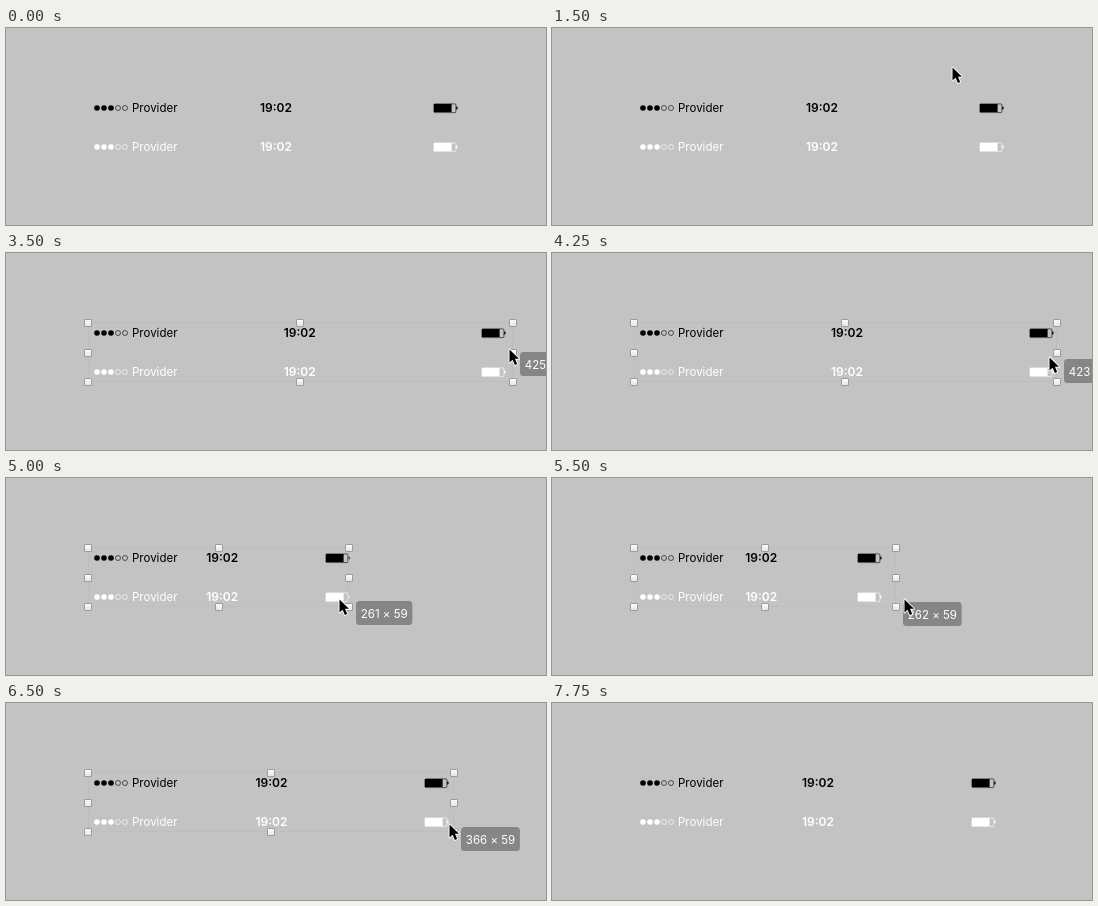
Animation, 540 px wide and 197 px high, one loop 9000 ms. Source, as an HTML page with a canvas:

```html
<!DOCTYPE html>
<html lang="en">
<head>
<meta charset="utf-8">
<title>Resizing status bars</title>
<style>
  html, body { margin: 0; width: 100%; height: 100%; overflow: hidden; background: #c3c3c3; }
  canvas { display: block; width: 540px; height: 197px; }
</style>
</head>
<body>
<canvas id="stage"></canvas>
<script>
const WIDTH = 540, HEIGHT = 197, LOOP = 9000, STEP = 250;
const LEFT = 82, TOP = 70, BOTTOM = 129;
const LAG = 45; // ms the bars trail the selection, and the selection trails the cursor

const canvas = document.getElementById('stage');
const ctx = canvas.getContext('2d');
const ratio = window.devicePixelRatio || 1;
canvas.width = WIDTH * ratio;
canvas.height = HEIGHT * ratio;
ctx.scale(ratio, ratio);

const ease = p => p < 0.5 ? 4 * p ** 3 : 1 - 4 * (1 - p) ** 3;

// Each move is [start time, end time, distance].
function travel(time, origin, ...moves) {
  return moves.reduce((value, [start, end, distance]) => {
    const progress = Math.min(1, Math.max(0, (time - start) / (end - start)));
    return value + distance * ease(progress);
  }, origin);
}

const widthAt = time => travel(time, 375,
  [2750, 3750, 53], [3976, 5418, -185], [5256, 6000, 135], [6000, 6500, -12], [7250, 7500, 1]);

const cursorX = time => LEFT + widthAt(time + LAG) +
  travel(time, -58, [1250, 2750, 53], [7000, 7500, 26]);

const cursorY = time => travel(time, 34,
  [1250, 2250, 82], [2250, 2750, -20], [3500, 5250, 25], [7000, 7500, 44]);

function setFont(size, weight = 400) {
  ctx.font = `${weight} ${size}px Inter, Roboto, sans-serif`;
}

function roundRect(x, y, w, h, r) {
  ctx.beginPath();
  ctx.roundRect(x, y, w, h, r);
}

function statusBar(y, width, color) {
  ctx.fillStyle = ctx.strokeStyle = color;
  ctx.lineWidth = 0.6;
  for (let i = 0; i < 5; i++) {
    ctx.beginPath();
    ctx.arc(91 + i * 7, y, i < 3 ? 2.8 : 2.5, 0, Math.PI * 2);
    i < 3 ? ctx.fill() : ctx.stroke();
  }
  setFont(11.5);
  ctx.fillText('Provider', 126, y + 4);
  setFont(12, 600);
  ctx.textAlign = 'center';
  ctx.fillText('19:02', LEFT + width / 2 + 0.5, y + 4);
  ctx.textAlign = 'left';

  const x = Math.round(LEFT + width - 30);
  roundRect(x + 0.9, y - 4.1, 22, 8.7, 1);
  ctx.stroke();
  ctx.fillRect(x + 1, y - 4, 17.6, 8);
  roundRect(x + 23.2, y - 1.6, 1.4, 3.2, [0, 1, 1, 0]);
  ctx.fill();
}

function handle(centerX, centerY) {
  const x = Math.round(centerX) - 4, y = Math.round(centerY) - 4;
  const shine = ctx.createLinearGradient(0, y, 0, y + 8);
  shine.addColorStop(0, '#fff');
  shine.addColorStop(1, '#e2e2e2');
  roundRect(x, y, 8, 8, 1.5);
  ctx.fillStyle = '#9c9c9c';
  ctx.fill();
  ctx.fillStyle = shine;
  ctx.fillRect(x + 1, y + 1, 6, 6);
}

function selection(width) {
  ctx.strokeStyle = '#b9b9b9';
  ctx.lineWidth = 1;
  ctx.setLineDash([1, 1]);
  ctx.strokeRect(LEFT + 0.5, TOP - 0.5, Math.round(width) - 1, BOTTOM - TOP);
  ctx.setLineDash([]);

  for (const column of [0, 0.5, 1]) {
    for (const row of [0, 0.5, 1]) {
      if (column === 0.5 && row === 0.5) continue;
      handle(LEFT + width * column, TOP + (BOTTOM - TOP) * row);
    }
  }
}

function sizeLabel(width, top) {
  const label = `${Math.round(width)} × 59`;
  const x = Math.round(LEFT + width + 7), y = Math.floor(top);
  setFont(11.5);
  roundRect(x, y, ctx.measureText(label).width + 9.5, 24, 3.5);
  ctx.fillStyle = '#868686';
  ctx.fill();
  ctx.fillStyle = '#fff';
  ctx.fillText(label, x + 4.8, y + 16.5);
}

function cursor(x, y) {
  const arrow = new Path2D('M.5 .5V13.5L3.6 10.7L5.9 16L8.2 15L6 9.8H10Z');
  ctx.save();
  ctx.translate(Math.round(x), Math.round(y));
  ctx.lineJoin = 'round';
  ctx.fillStyle = '#000';
  ctx.strokeStyle = '#fff';
  ctx.lineWidth = 1.8;
  ctx.stroke(arrow);
  ctx.fill(arrow);
  ctx.restore();
}

function draw(now) {
  const time = Math.floor((now % LOOP) / STEP) * STEP;
  const during = (start, end) => time >= start && time < end;
  const width = widthAt(time), barWidth = widthAt(time - LAG);
  const y = cursorY(time);

  ctx.fillStyle = '#c3c3c3';
  ctx.fillRect(0, 0, WIDTH, HEIGHT);
  statusBar(80, barWidth, '#000');
  statusBar(119, barWidth, '#fff');
  if (during(2000, 7500)) selection(width);
  if (during(3000, 7250)) sizeLabel(width, y + 3);
  if (during(1250, 7750)) cursor(cursorX(time), y);
}

const start = performance.now();
function frame() {
  draw(performance.now() - start);
  requestAnimationFrame(frame);
}
frame();
</script>
</body>
</html>
```
